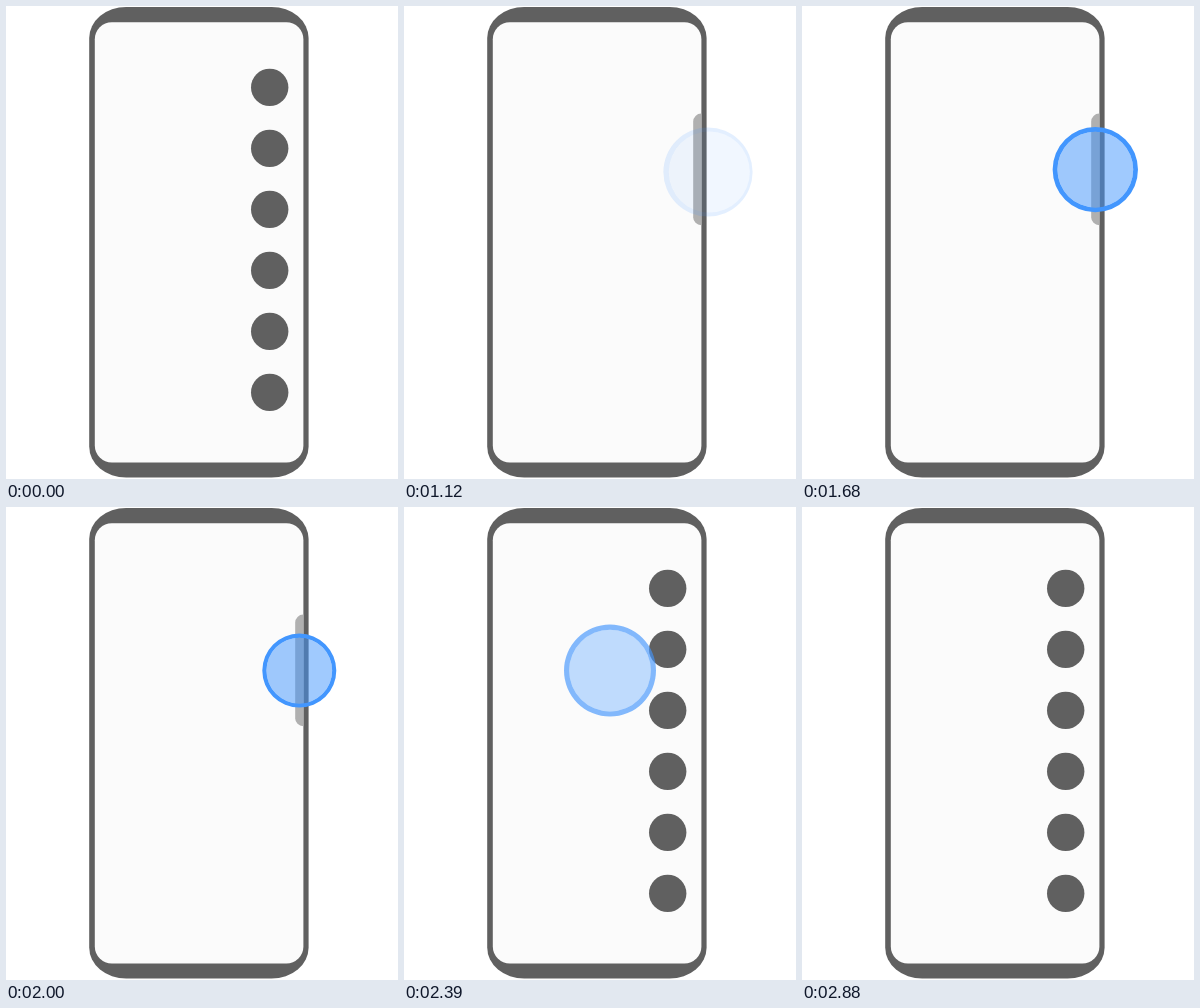
These frames come from a looping animation (392x473 px, 4240 ms). An HTML page with a canvas:

```html
<!DOCTYPE html>
<html lang="en">
<head>
<meta charset="utf-8">
<title>Edge panel swipe</title>
<style>
html, body { margin: 0; width: 100%; height: 100%; overflow: hidden; background: #fff; }
canvas { display: block; width: 392px; height: 473px; }
</style>
</head>
<body>
<canvas id="stage"></canvas>
<script>
const W = 392, H = 473, LOOP = 4240;
const GREY = '#606060', BLUE = '#4296fe';
const canvas = document.getElementById('stage');
const ctx = canvas.getContext('2d');
const ratio = window.devicePixelRatio || 1;
canvas.width = Math.round(W * ratio);
canvas.height = Math.round(H * ratio);
ctx.scale(ratio, ratio);

const clamp = v => Math.max(0, Math.min(1, v));
const lerp = (a, b, k) => a + (b - a) * k;
const part = (t, from, to) => clamp((t - from) / (to - from));
const ease = k => k * k * (3 - 2 * k);

// The touch moves in short steps; everything else holds still.
function stepTime(t) {
  const snap = (start, size) => start + Math.floor((t - start) / size) * size;
  if (t < 1680) return snap(1120, 70);
  if (t < 2240) return snap(1680, 80);
  return snap(2240, 72.5);
}

function roundBox(x, y, w, h, radii, color) {
  ctx.fillStyle = color;
  ctx.beginPath();
  ctx.roundRect(x, y, w, h, radii);
  ctx.fill();
}

function drawPhone() {
  roundBox(83.2, 1, 219.4, 470.6, { x: 37, y: 31 }, GREY);
  roundBox(88.8, 16.2, 208.6, 440.4, 17, '#fbfbfb');
}

function drawDots() {
  ctx.fillStyle = GREY;
  for (let i = 0; i < 6; i++) {
    ctx.beginPath();
    ctx.arc(263.7, 81.4 + i * 61, 18.7, 0, Math.PI * 2);
    ctx.fill();
  }
}

function touchAt(t) {
  const arrive = ease(part(t, 1330, 1680));
  const press = ease(part(t, 1610, 2000));
  const swipe = ease(part(t, 2000, 2385));
  const alpha = t < 2240 ? part(t, 1050, 1517) : 1 - part(t, 2240, 2530) * 0.7 - part(t, 2385, 2530) * 0.3;
  let r = lerp(44.6, 43.2, arrive);
  r = lerp(r, 37, press);
  r = lerp(r, 46, swipe);
  return {
    x: lerp(lerp(304, 293.3, arrive), 206, swipe),
    y: lerp(166, 163.6, arrive),
    r,
    line: r * lerp(0.09, 0.112, arrive),
    shift: lerp(1.3, 0, arrive),
    alpha
  };
}

function drawTouch(t) {
  const { x, y, r, line, shift, alpha } = touchAt(t);
  if (alpha <= 0) return;
  const inner = r - line;
  ctx.fillStyle = BLUE;
  ctx.globalAlpha = alpha * 0.5;
  ctx.beginPath();
  ctx.arc(x + shift, y, inner, 0, Math.PI * 2);
  ctx.fill();
  ctx.globalAlpha = alpha;
  ctx.beginPath();
  ctx.arc(x, y, r, 0, Math.PI * 2);
  ctx.moveTo(x + shift + inner, y);
  ctx.arc(x + shift, y, inner, 0, Math.PI * 2);
  ctx.fill('evenodd');
  ctx.globalAlpha = 1;
}

function draw(t) {
  ctx.fillStyle = '#fff';
  ctx.fillRect(0, 0, W, H);
  drawPhone();
  if (t >= 630 && t < 2240) {
    roundBox(289.2, 107.6, 8.2, 111.6, [8, 0, 0, 8], '#b0b0b0');
  } else {
    drawDots();
  }
  if (t >= 1120 && t < 2530) drawTouch(stepTime(t));
}

const start = performance.now();
function tick() {
  draw((performance.now() - start) % LOOP);
  requestAnimationFrame(tick);
}
tick();
</script>
</body>
</html>
```
